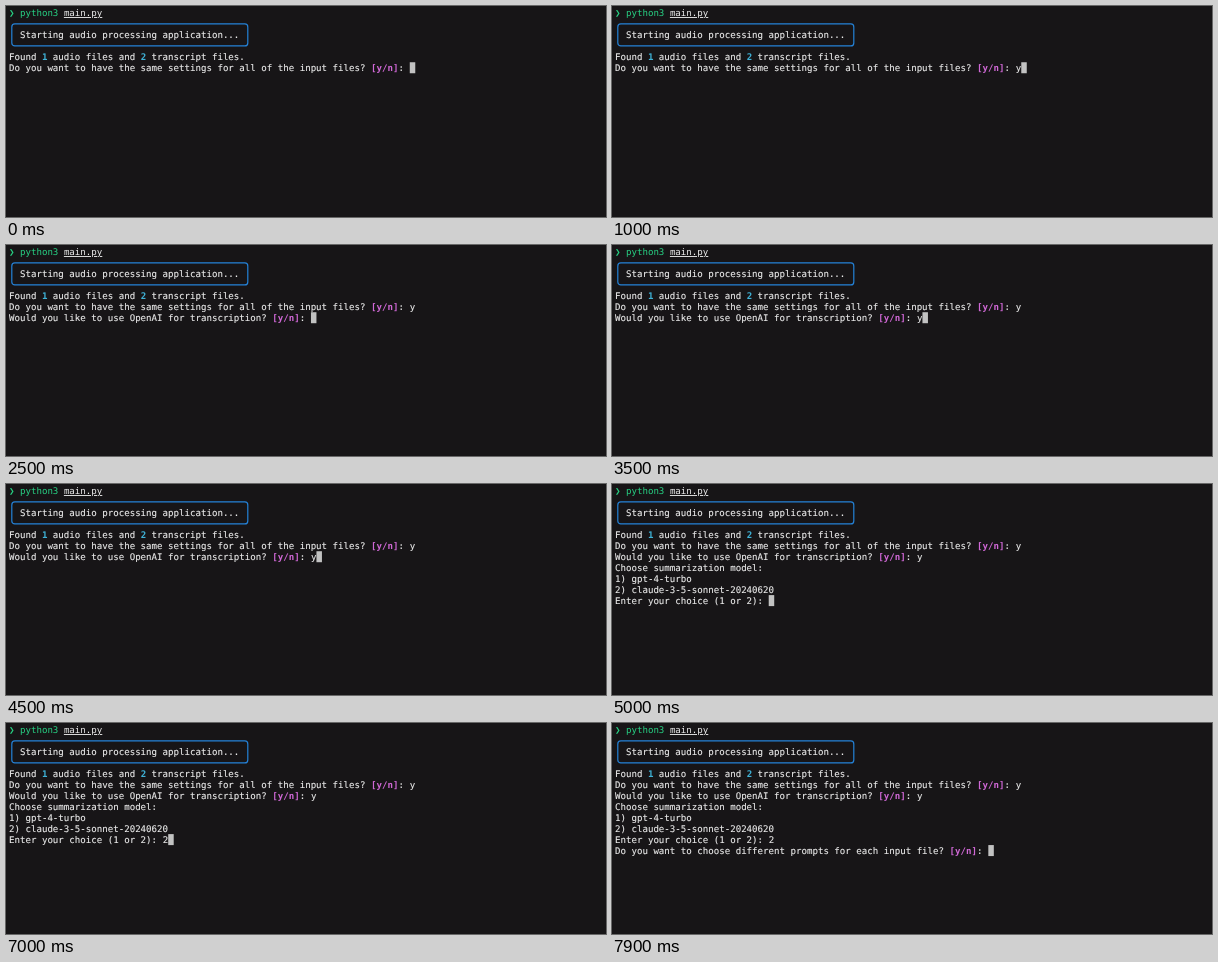
Write an HTML page that moves like this. It is 600 by 211 pixels and loops after 8000 ms.

```html
<!DOCTYPE html>
<html lang="en">
<head>
<meta charset="utf-8">
<title>Terminal session</title>
<style>
  html, body { margin: 0; width: 100%; height: 100%; overflow: hidden; background: #171517; }
  svg { display: block; }
  text {
    font: 9.12px "DejaVu Sans Mono", monospace;
    fill: #ececec;
    stroke: #ececec;
    stroke-width: .12px;
    white-space: pre;
    text-rendering: geometricPrecision;
  }
  tspan { stroke: none; }
  .green { fill: #27d284; }
  .path { text-decoration: underline #aaa .5px; text-underline-offset: 1.2px; }
  .num { fill: #3fb3d8; font-weight: bold; }
  .ask { fill: #d068d6; font-weight: bold; }
</style>
</head>
<body>
<svg width="600" height="211" viewBox="0 0 600 211">
  <rect x="5.8" y="17.9" width="236" height="22" rx="3" fill="none" stroke="#2482d8" stroke-width="1.2"/>
  <g id="screen"></g>
  <rect id="cursor" width="5.5" height="11" fill="#c2c2c2"/>
</svg>
<script>
const LOOP = 8000, LEFT = 3, TOP = 1.4, CELL = 5.49, ROW = 10.97;
const span = (cls, s) => `<tspan class="${cls}">${s}</tspan>`;
const yesNo = ` ${span("ask", "[y/n]")}: `;

const screen = document.getElementById("screen");
const cursor = document.getElementById("cursor");

function addLine(row, html, col = 0) {
  const line = document.createElementNS("http://www.w3.org/2000/svg", "text");
  line.setAttribute("x", LEFT + col * CELL);
  line.setAttribute("y", TOP + row * ROW + 8.6);
  line.innerHTML = html;
  screen.append(line);
  return line;
}

addLine(0, span("green", "❯"));
addLine(0, span("green", "python3"), 2);
addLine(0, span("path", "main.py"), 10);
addLine(2, "Starting audio processing application...", 2);
addLine(4, `Found ${span("num", 1)} audio files and ${span("num", 2)} transcript files.`);

// Each prompt: lines shown from `at`, answer typed at `typed`
const prompts = [
  { row: 5, at: 0, typed: 800, answer: "y",
    lines: ["Do you want to have the same settings for all of the input files?" + yesNo] },
  { row: 6, at: 2200, typed: 3000, answer: "y",
    lines: ["Would you like to use OpenAI for transcription?" + yesNo] },
  { row: 7, at: 4700, typed: 6700, answer: "2",
    lines: ["Choose summarization model:", "1) gpt-4-turbo", "2) claude-3-5-sonnet-20240620",
            "Enter your choice (1 or 2): "] },
  { row: 11, at: 7700, typed: Infinity, answer: "",
    lines: ["Do you want to choose different prompts for each input file?" + yesNo] }
];

for (const p of prompts) {
  p.nodes = p.lines.map((html, i) => addLine(p.row + i, html));
  p.endRow = p.row + p.lines.length - 1;
  p.endCol = p.nodes.at(-1).textContent.length;
  p.reply = addLine(p.endRow, p.answer, p.endCol);
}

const show = (node, on) => node.setAttribute("visibility", on ? "visible" : "hidden");

function draw(t) {
  for (const p of prompts) {
    const typed = t >= p.typed;
    p.nodes.forEach(node => show(node, t >= p.at));
    show(p.reply, typed);
    if (t >= p.at) {
      cursor.setAttribute("x", LEFT + (p.endCol + typed) * CELL);
      cursor.setAttribute("y", TOP + p.endRow * ROW);
    }
  }
}

const start = performance.now();
function tick() {
  draw((performance.now() - start) % LOOP);
  requestAnimationFrame(tick);
}
tick();
</script>
</body>
</html>
```
